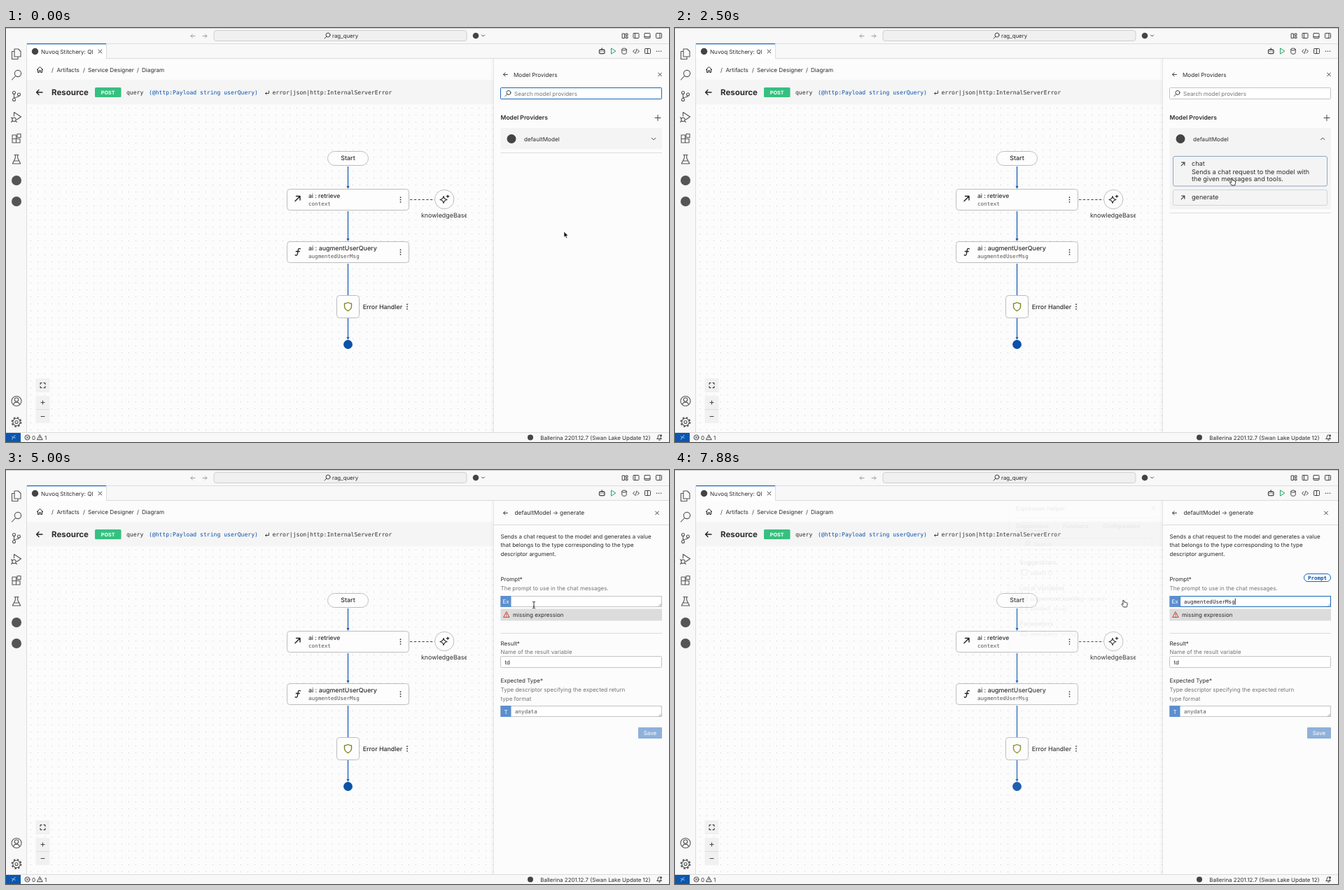
Recreate the animation shown at these times as an HTML page. Size 947 by 592 pixels, loop 8000 ms.

```html
<!DOCTYPE html>
<html lang="en">
<head>
<meta charset="utf-8">
<title>Flow diagram editor</title>
<style>
html, body { margin: 0; width: 100%; height: 100%; overflow: hidden; background: #fcfcfc; }
svg { display: block; width: 947px; height: 592px; }
text { font: 8px Inter, "Open Sans", sans-serif; fill: #2c2c2c; dominant-baseline: central; text-rendering: geometricPrecision; white-space: pre; }
.geo { font-size: 8.15px; }
.item { font-size: 9.15px; }
.node { font-size: 8.85px; font-weight: 500; }
.head { font-size: 8.85px; font-weight: 500; }
.mono { font: 8.1px "DejaVu Sans Mono", monospace; }
.mono.s { font-size: 7.55px; fill: #555; }
.dim { fill: #757575; }
.blue { fill: #0a52ab; }
.green { fill: #2a7a2e; }
.white { fill: #fff; }
.mid { text-anchor: middle; }
.ic { fill: none; stroke: #444; stroke-width: 1; stroke-linecap: round; stroke-linejoin: round; }
.big { stroke: #555; stroke-width: 1.1; }
.rule { stroke: #dcdcdc; stroke-width: 1; }
.box { fill: #fdfdfd; stroke: #bdbdbd; stroke-width: 1; }
.card { fill: #f4f4f4; stroke: #d2d5da; stroke-width: 1; }
.field { fill: #fff; stroke: #c4c4c4; }
.flow { stroke: #1459b0; stroke-width: 1.25; fill: none; }

/* One shared 8 s clock; jumps are step-end, motion is eased */
.t { animation: 8s step-end infinite; }
.focus { animation-name: focus; }
.picked { opacity: 0; animation-name: picked; }
.closed { animation-name: closed; }
.opened { opacity: 0; animation-name: opened; }
.plain { opacity: 0; animation-name: plain; }
.chat { opacity: 0; animation-name: chat; }
.gen { opacity: 0; animation-name: gen; }
.press { animation-name: press; }
.load { opacity: 0; animation-name: load; }
.list { animation-name: list; }
.form { opacity: 0; animation-name: form; }
.edit { opacity: 0; animation-name: edit; }
.typed { opacity: 0; animation-name: typed; }
.helper { opacity: 0; animation: helper 8s linear infinite; }
.arrow { animation-name: arrow; }
.hand { opacity: 0; animation-name: hand; }
.beam { opacity: 0; animation-name: beam; }
.cursor { animation: move 8s ease-in-out infinite; }

@keyframes focus { 0% { opacity: 1 } 18.75%, 100% { opacity: 0 } }
@keyframes picked { 0% { opacity: 0 } 21.9% { opacity: 1 } 26.6%, 100% { opacity: 0 } }
@keyframes closed { 0% { opacity: 1 } 26.6%, 100% { opacity: 0 } }
@keyframes opened { 0% { opacity: 0 } 26.6%, 100% { opacity: 1 } }
@keyframes plain { 0% { opacity: 0 } 26.6% { opacity: 1 } 28.9%, 100% { opacity: 0 } }
@keyframes chat { 0% { opacity: 0 } 28.9% { opacity: 1 } 35.9%, 100% { opacity: 0 } }
@keyframes gen { 0% { opacity: 0 } 35.9%, 100% { opacity: 1 } }
@keyframes press { 0% { stroke: #8fa6c2 } 43.75%, 100% { stroke: #0a57b5 } }
@keyframes load { 0% { opacity: 0; transform: translateX(-70px) } 43.75% { opacity: 1; transform: translateX(-70px) } 45.3% { opacity: 1; transform: none } 46.85%, 100% { opacity: 0 } }
@keyframes list { 0% { opacity: 1 } 46.85%, 100% { opacity: 0 } }
@keyframes form { 0% { opacity: 0 } 46.85%, 100% { opacity: 1 } }
@keyframes edit { 0% { opacity: 0 } 67.2%, 100% { opacity: 1 } }
@keyframes typed { 0% { opacity: 0 } 93.7%, 100% { opacity: 1 } }
@keyframes helper { 0%, 67.2% { opacity: 0 } 70.3%, 95.5% { opacity: 1 } 98.4%, 100% { opacity: .08 } }
@keyframes arrow { 0% { opacity: 1 } 12.5% { opacity: 0 } 46.85% { opacity: 1 } 60%, 100% { opacity: 0 } }
@keyframes hand { 0% { opacity: 0 } 12.5% { opacity: 1 } 46.85% { opacity: 0 } 81.5%, 100% { opacity: 1 } }
@keyframes beam { 0% { opacity: 0 } 60% { opacity: 1 } 81.5%, 100% { opacity: 0 } }
@keyframes move {
  0%, 1.6% { transform: translate(797px, 291px) }
  15.6%, 26.6% { transform: translate(800px, 157px) }
  31.2%, 33.5% { transform: translate(795px, 215px) }
  39%, 56.2% { transform: translate(789px, 247px) }
  62.4%, 78% { transform: translate(754px, 193px) }
  86.2%, 100% { transform: translate(640.5px, 186px) }
}
</style>
</head>
<body>
<svg viewBox="0 0 947 592">
<defs>
  <pattern id="dots" x="34" y="113" width="10" height="10" patternUnits="userSpaceOnUse"><circle cx="1.5" cy="1.5" r=".7" fill="#d6d6d6"/></pattern>
  <clipPath id="edge"><rect x="580" y="260" width="78" height="20"/></clipPath>
  <linearGradient id="shade"><stop offset="0" stop-color="#000" stop-opacity="0"/><stop offset="1" stop-color="#000" stop-opacity=".08"/></linearGradient>
  <g id="x"><path class="ic" d="M-2.4-2.4l4.8 4.8M2.4-2.4l-4.8 4.8"/></g>
  <g id="back"><path class="ic" d="M3 0H-3M-.4-2.6L-3 0l2.6 2.6"/></g>
  <g id="lens"><circle class="ic" cx="1" cy="-1" r="3"/><path class="ic" d="M-1.2 1.2L-4 4"/></g>
  <g id="out"><path class="ic" d="M-2.3 2.3L2.3-2.3M-1.7-2.3h4v4" style="stroke-width:1.2"/></g>
  <g id="more" fill="#333"><circle cy="-3.3" r=".9"/><circle r=".9"/><circle cy="3.3" r=".9"/></g>
  <g id="tip"><path d="M-2-4h4L0 0z" fill="#1459b0"/></g>
  <g id="grip"><path d="M-4 0L0-4M-2 0L0-2" stroke="#888" stroke-width=".7"/></g>
  <rect id="win" class="ic" x="-4" y="-3.5" width="8" height="7" rx=".8"/>
</defs>

<!-- Diagram canvas -->
<rect width="947" height="592" fill="#fcfcfc"/>
<rect x="30" y="109" width="666" height="469" fill="url(#dots)"/>
<rect x="30" y="74" width="666" height="35" fill="#f5f5f5"/>

<!-- Title bar -->
<rect width="947" height="22" fill="#f8f8f8"/>
<path d="M0 .5h947" stroke="#c9c9c9"/>
<g opacity=".5"><use href="#back" x="267" y="11.5"/><use href="#back" transform="translate(284 11.5) scale(-1 1)"/></g>
<rect x="297" y="3.5" width="361" height="15" rx="3.5" fill="#f0f0f0" stroke="#cfcfcf"/>
<use href="#lens" x="459" y="11"/>
<text x="466" y="11" style="font-size:7.8px">rag_query</text>
<circle cx="671" cy="11" r="4.3" fill="#444"/>
<path class="ic" d="M679.5 10l2 2 2-2"/>
<path class="ic" d="M880.5 8h3v6.5h-3zM885.5 8h2.5v2.5h-2.5zM885.5 12.200h2.5v2.3h-2.5z"/>
<use href="#win" x="900" y="11"/><path class="ic" d="M898.5 7.5v7"/>
<use href="#win" x="916" y="11"/><path class="ic" d="M912 12.5h8"/>
<use href="#win" x="932.5" y="11"/><path class="ic" d="M934 7.5v7"/>

<!-- Tabs -->
<rect x="30" y="22" width="917" height="22" fill="#f8f8f8"/>
<path class="rule" d="M0 22.5h947M143 43.5h804M143.5 23v21"/>
<rect x="30" y="22" width="113" height="22" fill="#fff"/>
<path d="M30 22.6h113" stroke="#1a66b8" stroke-width="1.2"/>
<circle cx="41.5" cy="33.5" r="4.7" fill="#444"/>
<text x="50" y="33.5" style="font-size:8.1px">Nuvoq Stitchery: QI</text>
<use href="#x" x="134.5" y="33.5"/>
<rect class="t load" x="100" y="43.5" width="25" height="1.7" fill="#0b5cb8"/>
<rect x="847.5" y="31" width="7.5" height="5.7" rx="1.5" class="ic" style="stroke-width:1.3"/><path class="ic" d="M851.2 31v-2.200M849.800 33.700h.1M852.800 33.700h.1" style="stroke-width:1.3"/>
<path class="ic" d="M864.5 29.3v7.800l6-3.900z" style="stroke:#27a269"/>
<ellipse class="ic" cx="883" cy="30.5" rx="3.200" ry="1.5"/><path class="ic" d="M879.800 30.5v5.200c0 2 6.400 2 6.400 0v-5.200"/>
<path class="ic" d="M898 31l-2.5 2.300 2.5 2.300M902 31l2.5 2.300-2.5 2.300M901 30l-2 6.600"/>
<use href="#win" x="916.5" y="33"/><path class="ic" d="M916.5 29.500v7"/>
<g fill="#444"><circle cx="929.5" cy="33.300" r=".8"/><circle cx="932.5" cy="33.300" r=".8"/><circle cx="935.5" cy="33.300" r=".8"/></g>

<!-- Activity bar -->
<rect y="22" width="29" height="556" fill="#f8f8f8"/>
<path class="rule" d="M29.5 22v556"/>
<g class="ic big">
  <path d="M12 30h5.500l3.500 3.500v7.500h-9zM12 33.500H8.500v11H17V41"/>
  <circle cx="17" cy="65" r="4.600"/><path d="M13.600 68.500L8.500 74"/>
  <circle cx="11.500" cy="92.500" r="2"/><circle cx="18.500" cy="95" r="2"/><circle cx="11.500" cy="102.500" r="2"/><path d="M11.500 94.500v6M18.500 97c0 2.500-6 1.500-7 3.500"/>
  <path d="M11.500 126v-5.500l10 6.500-6 4"/><circle cx="11.500" cy="131" r="2.700"/><path d="M7.500 128l2 1.500M7.500 134.500l2-1.500M15.500 134.500l-2-1.500"/>
  <path d="M9 153h5.500v11H9zM9 158.500h11v5.500H9M16 151.500h5v5h-5z"/>
  <path d="M12 181.500h6M13.300 181.500v4.500l-4 8h11.400l-4-8v-4.500M11.500 190h7"/>
  <circle cx="15" cy="533.500" r="7"/><circle cx="15" cy="531.500" r="2.700"/><path d="M10.500 538.500c1-4.500 8-4.500 9 0"/>
  <circle cx="15" cy="563.500" r="5.200"/><circle cx="15" cy="563.500" r="2"/><circle cx="15" cy="563.500" r="6.400" stroke-dasharray="2.500 2.527" stroke-linecap="butt" stroke-width="2"/>
</g>
<circle cx="15" cy="218" r="7" fill="#555"/>
<circle cx="15" cy="248" r="7" fill="#555"/>

<!-- Breadcrumb and resource header -->
<path class="ic" style="stroke:#222" d="M44.500 59.500l4-4 4 4M45.500 59v4.500h2v-2.700h2v2.700h2V59"/>
<text x="65" y="59.500">/</text><text class="geo" x="72.500" y="59.500">Artifacts</text>
<text x="110" y="59.500">/</text><text class="geo" x="117" y="59.500">Service Designer</text>
<text x="187" y="59.500">/</text><text class="geo" x="194" y="59.500">Diagram</text>
<path class="ic" style="stroke:#222;stroke-width:1.300" d="M52 92h-8.500M47 88.500L43.500 92l3.500 3.500"/>
<text x="65" y="92.300" style="font-size:11.500px;font-weight:700">Resource</text>
<rect x="127" y="85" width="37.500" height="14" rx="1.500" fill="#36c07f"/>
<text class="white mid" x="145.700" y="92" style="font-size:7.200px;font-weight:700">POST</text>
<text class="mono" x="172" y="91.500">query</text>
<text class="mono blue" x="204" y="91.500">(@http:Payload string userQuery)</text>
<path class="ic" d="M375.500 90v3.500h-5M372 92l-1.500 1.500 1.500 1.500"/>
<text class="mono" x="380.500" y="91.500">error|json|http:InternalServerError</text>

<!-- Flow -->
<path class="flow" d="M488.500 198v30M488.500 262v41M488.500 337v45M488.500 415v28"/>
<use href="#tip" x="488.500" y="230"/><use href="#tip" x="488.500" y="305"/><use href="#tip" x="488.500" y="446"/>
<rect class="box" x="459.500" y="176.500" width="58" height="20" rx="10"/>
<text class="node mid" x="488.500" y="186.300">Start</text>
<rect class="box" x="401.500" y="230.500" width="174" height="30" rx="4"/>
<path class="ic" style="stroke:#222;stroke-width:1.400" d="M413 247.500l7-7M414.500 240.500h5.500v5.500"/>
<text class="node" x="432" y="240.700" style="font-size:8.500px">ai : retrieve</text><text class="mono s" x="432" y="251">context</text>
<use href="#more" x="563.500" y="245.500"/>
<path d="M577 245.500h35" stroke="#444" stroke-width="1.200" stroke-dasharray="3.300 2.500"/>
<circle class="box" cx="626.200" cy="245" r="13.700"/>
<path class="ic" style="stroke:#222;stroke-width:1.200" d="M625 240.500q.8 4.200 5 5-4.200.8-5 5-.8-4.200-5-5 4.200-.8 5-5zM631 239v3.400M629.300 240.700h3.400"/>
<text x="593" y="268" style="font-size:8.900px" clip-path="url(#edge)">knowledgeBase</text>
<rect class="box" x="401.500" y="305.500" width="174" height="30" rx="4"/>
<path class="ic" style="stroke:#222;stroke-width:1.300" d="M420.500 315.800c-3-1.800-3.300 1.500-3.700 4.500s-.8 6-3.600 4.300M414.300 319.500h5"/>
<text class="node" x="432" y="315.700">ai : augmentUserQuery</text><text class="mono s" x="432" y="326">augmentedUserMsg</text>
<use href="#more" x="563.500" y="320.500"/>
<rect class="box" x="472.500" y="382.500" width="32" height="32" rx="4"/>
<path class="ic" style="stroke:#7d8b1c;stroke-width:1.400" d="M488.500 392.500q2.500 1.500 5 1.500v4.500q-.5 4-5 6-4.500-2-5-6V394q2.500 0 5-1.500z"/>
<text class="node" x="509.700" y="399">Error Handler</text><use href="#more" x="573" y="398.500"/>
<circle cx="488.500" cy="452.500" r="6.400" fill="#0b52a8"/>

<!-- Zoom controls -->
<path d="M42.500 501h20v20h-20zM42.500 526h20v19h-20zM42.500 546h20v19h-20z" fill="#f1f1f1"/>
<path d="M42.500 545.500h20" stroke="#ddd"/>
<path class="ic" style="stroke:#222" d="M49 509.500v-2h2M54 507.500h2v2M56 512.500v2h-2M51 514.500h-2v-2"/>
<path class="ic" d="M50 535.500h5M52.500 533v5M50 555.500h5"/>

<!-- Side panel -->
<rect x="691" y="44" width="5" height="534" fill="url(#shade)" opacity=".4"/>
<rect x="696" y="44" width="251" height="534" fill="#fcfcfc"/>
<path d="M696.500 44v534" stroke="#e6e6e6"/>

<g class="t list">
  <use href="#back" x="713.500" y="66.500"/><text x="725" y="66.500" class="geo">Model Providers</text><use href="#x" x="934" y="66.500"/>
  <rect class="field" x="706.500" y="85.500" width="230" height="16" rx="1"/>
  <rect class="t focus" x="706.500" y="85.500" width="230" height="16" rx="1" fill="none" stroke="#1a66b8"/>
  <use href="#lens" x="717" y="93.500"/><text class="dim" x="726" y="94">Search model providers</text>
  <text x="706.500" y="129" style="font-size:8.550px;font-weight:600">Model Providers</text>
  <path class="ic" d="M927 128.500h8M931 124.500v8"/>
  <rect x="706.500" y="143" width="230.500" height="30" rx="2" fill="#f4f4f4"/>

  <path class="t closed rule" d="M706.500 178.500H937"/>
  <g class="t plain">
    <rect x="706.500" y="143" width="230.500" height="95" rx="2" fill="#f4f4f4"/>
    <rect class="card" x="711.500" y="183.500" width="220" height="22" rx="2.500"/>
    <use href="#out" x="725.500" y="194.500"/><text class="item" x="738" y="194">chat</text>
    <rect class="card" x="711.500" y="211.500" width="220" height="22" rx="2.500"/>
    <use href="#out" x="725.500" y="222"/><text class="item" x="738" y="222">generate</text>
    <path class="rule" d="M706.500 243.500H937"/>
  </g>
  <g class="t chat">
    <rect x="706.500" y="143" width="230.500" height="116" rx="2" fill="#f4f4f4"/>
    <rect class="card" x="711.500" y="183.500" width="220" height="42.500" rx="2.500" style="stroke:#8fa6c2"/>
    <use href="#out" x="725.500" y="194.500"/><text class="item" x="738" y="194">chat</text>
    <text class="item" x="738" y="206">Sends a chat request to the model with</text>
    <text class="item" x="738" y="216.500">the given messages and tools.</text>
    <rect class="card" x="711.500" y="231.500" width="220" height="22" rx="2.500"/>
    <use href="#out" x="725.500" y="242.500"/><text class="item" x="738" y="242.500">generate</text>
    <path class="rule" d="M706.500 264.500H937"/>
  </g>
  <g class="t gen">
    <rect x="706.500" y="143" width="230.500" height="137" rx="2" fill="#f4f4f4"/>
    <rect class="card" x="711.500" y="183.500" width="220" height="22" rx="2.500"/>
    <use href="#out" x="725.500" y="194.500"/><text class="item" x="738" y="194">chat</text>
    <rect class="card t press" x="711.500" y="210.500" width="220" height="64.500" rx="2.500"/>
    <use href="#out" x="725.500" y="222"/><text class="item" x="738" y="222">generate</text>
    <text class="item" x="738" y="233.500">Sends a chat request to the model and</text>
    <text class="item" x="738" y="244">generates a value that belongs to the</text>
    <text class="item" x="738" y="255">type corresponding to the type</text>
    <text class="item" x="738" y="265.500">descriptor argument.</text>
    <path class="rule" d="M706.500 285.500H937"/>
  </g>
  <circle cx="722" cy="158.500" r="6.500" fill="#444"/>
  <rect class="t picked" x="739.500" y="153" width="52" height="11" fill="#9fc8f0"/>
  <text class="geo" x="740" y="158.500">defaultModel</text>
  <path class="ic t closed" d="M922.500 157.300l2.700 2.700 2.700-2.700"/>
  <path class="ic t opened" d="M922.500 159.700l2.700-2.700 2.700 2.700"/>
</g>

<g class="t form">
  <use href="#back" x="713.500" y="61.500"/><text x="726.500" y="62" style="font-size:8.350px">defaultModel → generate</text><use href="#x" x="930" y="61.500"/>
  <path class="rule" d="M696 78.500h251"/>
  <text x="706.500" y="95">Sends a chat request to the model and generates a value</text>
  <text x="706.500" y="107">that belongs to the type corresponding to the type</text>
  <text x="706.500" y="119.500">descriptor argument.</text>
  <text x="706.500" y="156">Prompt*</text>
  <text class="dim" x="706.500" y="169">The prompt to use in the chat messages.</text>
  <rect class="field" x="706.500" y="180.500" width="230" height="15"/>
  <g class="t edit">
    <rect x="721.500" y="180.500" width="215" height="15" fill="#fff" stroke="#1a66b8"/>
    <rect x="898.500" y="148.500" width="38" height="11" rx="5.500" fill="#fff" stroke="#1a66b8"/>
    <text class="mono blue mid" x="917.500" y="154" style="font-size:7.500px;font-weight:700">Prompt</text>
  </g>
  <g class="t typed">
    <text class="mono s" x="727" y="188" style="fill:#222">augmentedUserMsg</text>
    <path d="M800.300 183.500v9" stroke="#222" stroke-width=".9"/>
  </g>
  <use href="#grip" x="936" y="195"/>
  <rect x="706.500" y="180" width="15" height="16" fill="#5b8fce"/><text class="white mid" x="714" y="188">Ex</text>
  <rect x="706.500" y="198.500" width="230.500" height="17" fill="#dcdcdc"/>
  <path class="ic" style="stroke:#c8452f" d="M715 203l4 7.500h-8zM715 205.700v2M715 209.200v.1"/>
  <text x="724" y="207">missing expression</text>
  <path class="rule" d="M706.500 233.500H937"/>
  <text x="706.500" y="247.500">Result*</text>
  <text class="dim" x="706.500" y="259.500">Name of the result variable</text>
  <rect class="field" x="706.500" y="266.500" width="230" height="16" rx="1"/>
  <text x="712.500" y="274.500">td</text>
  <text x="706.500" y="301">Expected Type*</text>
  <text class="dim" x="706.500" y="314">Type descriptor specifying the expected return</text>
  <text class="dim" x="706.500" y="326.500">type format</text>
  <rect class="field" x="706.500" y="337.500" width="230" height="15"/>
  <rect x="706.500" y="337" width="15" height="16" fill="#5b8fce"/><text class="white mid" x="714" y="345.500">T</text>
  <text class="mono s" x="727" y="345.500">anydata</text><use href="#grip" x="936" y="352.500"/>
  <rect x="903" y="368" width="34" height="16" rx="1" fill="#8fb1da"/><text class="white mid" x="920" y="376">Save</text>
</g>

<!-- Expression helper -->
<g class="helper">
  <rect x="471" y="44" width="6" height="534" fill="url(#shade)"/>
  <rect x="477" y="44" width="219.500" height="534" fill="#fcfcfc"/>
  <path d="M696 182l6 6-6 6z" fill="#f1f1f1"/>
  <path class="rule" d="M477.500 44v534M482 68.500h209M488 120.500h198M696.500 44v534"/>
  <text class="geo" x="487" y="55">Expression Helper</text><use href="#x" x="683" y="54.500"/>
  <text x="487" y="80">Suggestions</text><text x="554" y="80">Functions</text><text x="611.500" y="80">Configurables</text>
  <path d="M487 87h47" stroke="#1a66b8" stroke-width="1.200"/>
  <rect class="field" x="492.500" y="97.500" width="189" height="16" rx="1"/>
  <use href="#lens" x="503" y="105.500"/><text class="dim" x="512" y="106">Search</text>
  <text class="head" x="492" y="132.500">Suggestions</text>
  <rect class="ic" x="495" y="142.500" width="7.500" height="7.500" rx=".6"/><text x="507" y="146.500">object {}</text>
  <text class="head" x="492" y="169.500">Local Variables</text>
  <path class="ic" d="M495.500 180.500h-1.500v6h1.500M501.500 180.500h1.500v6h-1.500"/><circle class="ic" cx="498.500" cy="183.500" r="1.400"/>
  <text x="507" y="183.500">augmentedUserMsg</text><text class="green" x="589" y="183.500">record</text>
  <path class="ic" d="M495.500 194.500h-1.500v6h1.500M501 194.500h1.500v6h-1.500"/>
  <text x="507" y="197.500">context</text><text class="green" x="540.500" y="197.500">array</text>
  <text class="head" x="492" y="220">Parameters</text>
  <rect class="ic" x="494.500" y="231" width="8" height="6" rx=".8"/><path class="ic" d="M496.800 234h.2M498.500 234h.1M500.300 234h.1"/>
  <text x="507" y="234">userQuery</text><text class="green" x="551.500" y="234">string</text>
</g>

<!-- Status bar -->
<rect y="578" width="947" height="14" fill="#f8f8f8"/>
<path class="rule" d="M0 578.500h947"/>
<rect y="579" width="21" height="13" fill="#0b57b0"/>
<path class="ic" style="stroke:#fff;stroke-width:.8" d="M8.500 584l2 2-2 2M13 582.500l-2 2 2 2"/>
<circle class="ic" cx="30.500" cy="585.500" r="3.500"/><path class="ic" d="M29.300 584.300l2.400 2.400M31.700 584.300l-2.400 2.400"/>
<text x="37" y="585.500">0</text>
<path class="ic" d="M48.500 582l3.700 6.700h-7.400zM48.500 584.700v1.600"/><text x="55" y="585.500">1</text>
<circle cx="749" cy="585.500" r="4" fill="#444"/>
<text x="763.300" y="585.500" style="font-size:7.950px">Ballerina 2201.12.7 (Swan Lake Update 12)</text>
<path class="ic" d="M930 587.500q1.300-1 1.300-3.500 0-2.200 2-2.200M936.500 587.500H930M933.800 587.500q2 0 1.900-2.500M932.500 589.200h2"/><circle cx="935.500" cy="582.700" r="1.500" fill="#444"/>

<!-- Pointer -->
<g class="cursor">
  <path class="t arrow" d="M0 0v8.300l1.900-1.700 1.300 3 1.400-.6-1.300-2.900h2.600z" fill="#111" stroke="#fff" stroke-width=".6"/>
  <path class="t hand" d="M-.8.6q.8-1.200 1.600 0L1.500 3.200q.9-.7 1.600.2.900-.5 1.400.4 1-.2 1.200.9L5.500 7.500 4.600 10H.2L-2.500 6.300q-.2-1.200 1-.8l.9.8z" fill="#fff" stroke="#222" stroke-width=".9" stroke-linejoin="round"/>
  <path class="t beam" d="M-2-4.800Q0-4.800 0-3.500 0-4.800 2-4.800M0-3.500v7M-2 4.800Q0 4.800 0 3.500 0 4.800 2 4.800M-1 1.800h2" fill="none" stroke="#222" stroke-width=".9"/>
</g>
</svg>
</body>
</html>
```
